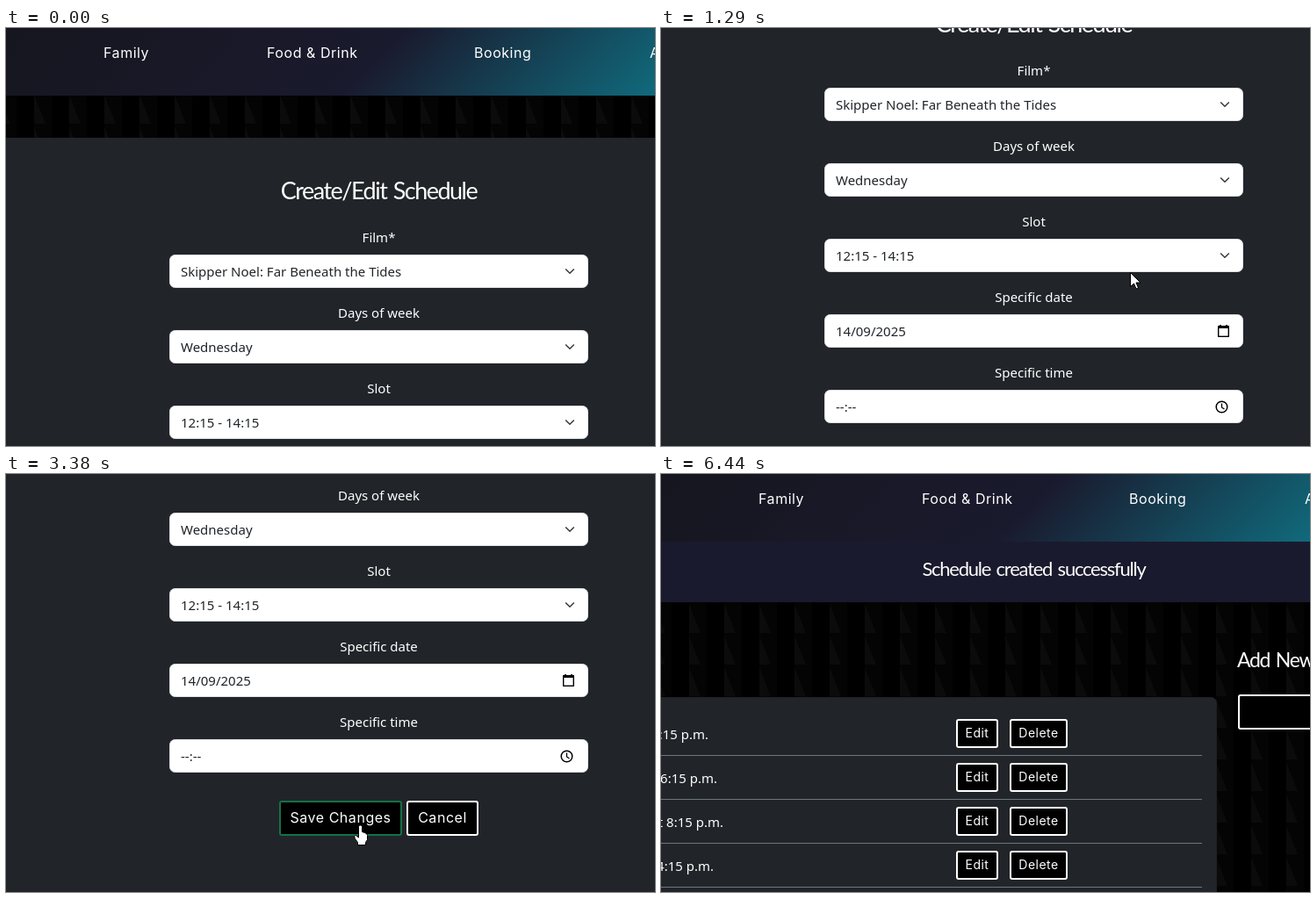
Recreate the animation shown at these times as an HTML page with a canvas. Size 739 by 476 pixels, loop 6.46 s.

```html
<!DOCTYPE html>
<html lang="en">
<head>
<meta charset="utf-8">
<title>Schedule editor</title>
<style>
html, body { margin: 0; width: 100%; height: 100%; overflow: hidden; background: #000; }
canvas { display: block; }
</style>
</head>
<body>
<canvas id="stage" width="739" height="476"></canvas>
<script>
const W = 739, H = 476, LOOP = 6460, SWITCH = 3830, TICK = 30;
const ctx = document.getElementById('stage').getContext('2d');

// Spacing in em, word gap in px
const FACES = {
  body: { family: '"Noto Sans", "Open Sans", sans-serif', spacing: 0, gap: 0 },
  nav: { family: 'Inter, sans-serif', spacing: 0.034, gap: 0 },
  title: { family: 'Lato, sans-serif', spacing: -0.056, gap: 2 }
};
const GREEN = [21, 112, 71], RED = [220, 53, 69], WHITE = [255, 255, 255];

// Keyframes: [time, value, ...]
const SCROLL = [[1030, 0], [1110, 41], [1290, 190], [1370, 252], [1440, 296], [1500, 300]];
const POINTER = [
  [670, 640, 478], [850, 588, 352], [1040, 534, 278], [1560, 534, 278],
  [1780, 518, 345], [1970, 490, 398], [2180, 403, 400], [4680, 403, 400],
  [4830, 374, 352], [4980, 374, 299], [5120, 428, 298], [5320, 460, 438], [5490, 505, 480]
];

const FIELDS = [
  ['Film*', 'Skipper Noel: Far Beneath the Tides', chevron],
  ['Days of week', 'Wednesday', chevron],
  ['Slot', '12:15 - 14:15', chevron],
  ['Specific date', '14/09/2025', calendar],
  ['Specific time', '--:--', clock]
];
const ROWS = [
  ['Sunday at 2:15 p.m.', 54], ['Sunday at 6:15 p.m.', 64],
  ['Sunday at 8:15 p.m.', 71], ['Monday at 4:15 p.m.', 60]
];

const formButtons = [
  { x: 311, y: 672, w: 140, h: 40, text: 'Save Changes', size: 16, hover: GREEN },
  { x: 456, y: 672, w: 82, h: 40, text: 'Cancel', size: 16, hover: RED }
];
const listButtons = ROWS.flatMap((_, i) => [
  { x: 336, y: 279 + i * 50, w: 48, h: 33, text: 'Edit', size: 14, hover: GREEN },
  { x: 397, y: 279 + i * 50, w: 66, h: 33, text: 'Delete', size: 14, hover: RED }
]);

// Motion advances in ticks, like a screen recording
function track(keys, time, k = 1) {
  const t = Math.floor(time / TICK) * TICK;
  if (t <= keys[0][0]) return keys[0][k];
  for (let i = 1; i < keys.length; i++) {
    const a = keys[i - 1], b = keys[i];
    if (t < b[0]) return a[k] + (b[k] - a[k]) * (t - a[0]) / (b[0] - a[0]);
  }
  return keys[keys.length - 1][k];
}

function pointerAt(t) {
  if (t >= 6380 && t < 6440) return { x: 634, y: 472 };
  if (t < 670 || t > 5490) return null;
  return { x: track(POINTER, t, 1), y: track(POINTER, t, 2) };
}

function isOver(b, t) {
  const p = pointerAt(t), scroll = t < SWITCH ? track(SCROLL, t) : 0;
  if (!p) return false;
  const x = p.x - b.x, y = p.y + scroll - b.y;
  return x >= 0 && x <= b.w && y >= 0 && y <= b.h;
}

// Border fade: share of the last moments spent under the pointer
function hoverLevel(b, t, since) {
  let n = 0;
  for (let i = 0; i < 8; i++) {
    const u = t - i * 11;
    if (u >= since && isOver(b, u)) n++;
  }
  return n / 8;
}

function type(str, x, y, size, face, align = 'left', color = '#fff') {
  const f = FACES[face];
  ctx.font = `${size}px ${f.family}`;
  ctx.letterSpacing = `${f.spacing * size}px`;
  ctx.wordSpacing = `${f.gap}px`;
  ctx.textAlign = align;
  ctx.fillStyle = color;
  ctx.fillText(str, x, y);
}

function box(x, y, w, h, r, fill, line, width = 1) {
  ctx.beginPath();
  ctx.roundRect(x + width / 2, y + width / 2, w - width, h - width, r);
  ctx.fillStyle = fill;
  ctx.fill();
  ctx.strokeStyle = line;
  ctx.lineWidth = width;
  ctx.stroke();
}

function rect(x, y, w, h, color) {
  ctx.fillStyle = color;
  ctx.fillRect(x, y, w, h);
}

function poly(points, closed) {
  ctx.beginPath();
  points.forEach(([x, y]) => ctx.lineTo(x, y));
  if (closed) ctx.closePath();
}

function button(b, t, since) {
  const k = hoverLevel(b, t, since);
  const c = WHITE.map((v, i) => Math.round(v + (b.hover[i] - v) * k));
  box(b.x, b.y, b.w, b.h, 2, '#000', `rgb(${c})`, 2);
  type(b.text, b.x + b.w / 2, b.y + b.h / 2 + b.size * 0.3, b.size, 'nav', 'center');
}

function chevron(y) {
  poly([[637.2, y - 2.5], [642, y + 2.3], [646.8, y - 2.5]]);
  ctx.strokeStyle = '#343a40';
  ctx.lineWidth = 1.5;
  ctx.stroke();
}

function calendar(y) {
  ctx.strokeStyle = '#000';
  ctx.lineWidth = 1.4;
  ctx.strokeRect(634.7, y - 5.3, 11.6, 11.6);
  rect(634, y - 6, 13, 3, '#000');
  rect(636, y - 7, 2, 2, '#000');
  rect(643, y - 7, 2, 2, '#000');
}

function clock(y) {
  ctx.strokeStyle = '#000';
  ctx.lineWidth = 1.5;
  ctx.beginPath();
  ctx.arc(638.5, y + 0.5, 6.3, 0, Math.PI * 2);
  ctx.stroke();
  poly([[638.5, y - 3.5], [638.5, y + 1], [641.5, y + 3]]);
  ctx.lineWidth = 1.3;
  ctx.stroke();
}

function wallpaper(top, bottom) {
  ctx.save();
  ctx.beginPath();
  ctx.rect(0, top, W, bottom - top);
  ctx.clip();
  rect(0, top, W, bottom - top, '#040404');
  for (let x = -40; x < W; x += 40) {
    rect(x + 12, top, 20, bottom - top, '#000');
    for (let y = 76; y < bottom; y += 36) {
      poly([[x + 32, y], [x + 45, y + 33], [x + 32, y + 33]], true);
      ctx.fillStyle = '#0b0b0b';
      ctx.fill();
    }
  }
  ctx.restore();
}

function header() {
  const g = ctx.createLinearGradient(0, 0, 408, 408);
  g.addColorStop(0, '#16161f');
  g.addColorStop(0.56, '#1a1a2e');
  g.addColorStop(1, '#106a7c');
  rect(0, 0, W, 77, g);
  type('Family', 111, 34, 16, 'nav');
  type('Food & Drink', 297, 34, 16, 'nav');
  type('Booking', 533, 34, 16, 'nav');
  type('About', 733, 34, 16, 'nav');
}

function formPage(t) {
  ctx.save();
  ctx.translate(0, -Math.round(track(SCROLL, t)));
  rect(0, 125, W, 700, '#212529');
  wallpaper(77, 125);
  header();
  type('Create/Edit Schedule', 424.5, 195, 27, 'title', 'center');
  FIELDS.forEach(([label, value, icon], i) => {
    const y = 258 + i * 86;
    type(label, 424.5, y - 14, 15, 'body', 'center');
    box(186, y, 477, 38, 6, '#fff', '#dee2e6');
    type(value, 199, y + 25, 15, 'body', 'left', '#212529');
    icon(y + 19);
  });
  formButtons.forEach(b => button(b, t, 0));
  ctx.restore();
}

function listPage(t) {
  wallpaper(146, H);
  header();
  rect(0, 77, W, 69, '#1a1a2e');
  type('Schedule created successfully', 424.5, 116, 22, 'title', 'center');
  type('Add New Schedule', 656, 220, 23, 'title');
  box(657, 251, 200, 40, 2, '#000', '#fff', 2);
  box(-20, 254, 653, 260, 6, '#212529', '#1d2124');
  ROWS.forEach(([text, right], i) => {
    type(text, right, 302 + i * 50, 15, 'body', 'right');
    rect(0, 320 + i * 50, 616, 1, '#6c757d');
  });
  listButtons.forEach(b => button(b, t, SWITCH));
}

const ARROW = [[0, 0], [0, 16], [4, 12.5], [6.5, 18.5], [9, 17.5], [6.5, 11.5], [11.5, 11.5]];
const HAND = [
  [-2, 1], [-1, -0.5], [1, -0.5], [2, 1], [2, 7], [5, 8], [7.5, 9.5], [8, 11], [8, 16], [6, 19],
  [6, 22], [-3, 22], [-3, 19], [-6, 15], [-7, 12], [-5, 11], [-2, 13.5]
];

function pointer(t) {
  const p = pointerAt(t);
  if (!p) return;
  const active = (t < SWITCH ? formButtons : listButtons).some(b => isOver(b, t));
  ctx.save();
  ctx.translate(Math.round(p.x) + 0.5, Math.round(p.y) + 0.5);
  poly(active ? HAND : ARROW, true);
  ctx.fillStyle = '#fff';
  ctx.strokeStyle = '#000';
  ctx.lineWidth = 1;
  ctx.lineJoin = 'round';
  ctx.fill();
  ctx.stroke();
  ctx.restore();
}

const start = performance.now();

function draw() {
  const t = (performance.now() - start) % LOOP;
  (t < SWITCH ? formPage : listPage)(t);
  pointer(t);
  requestAnimationFrame(draw);
}

draw();
</script>
</body>
</html>
```
